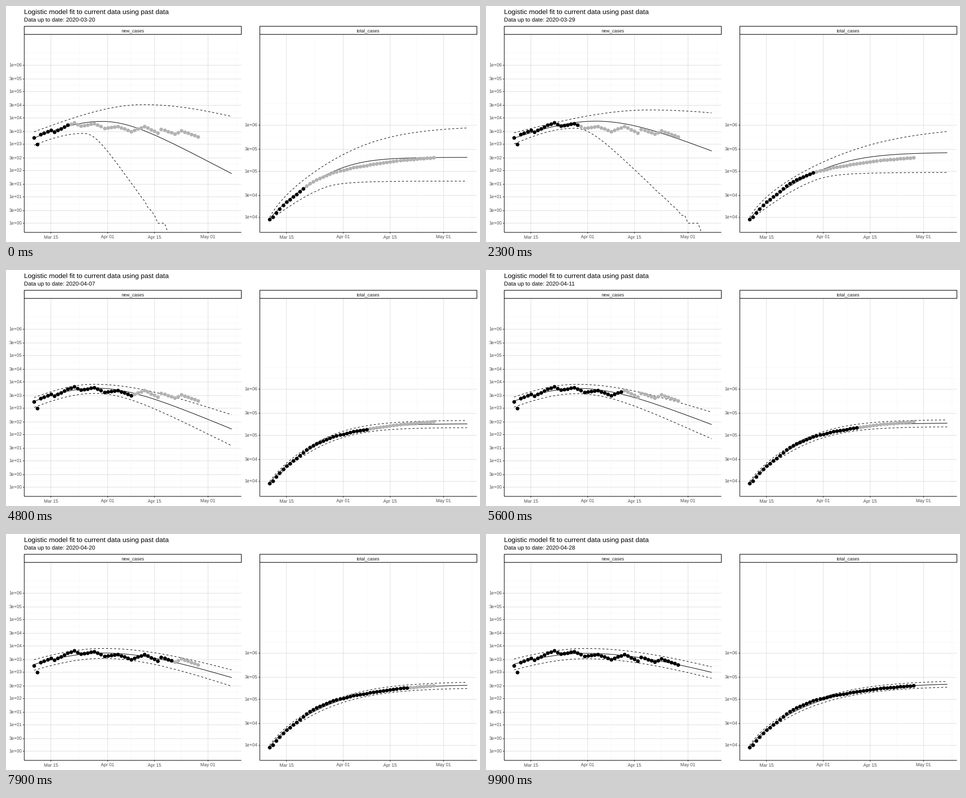
A matplotlib script for the animation above (10 s loop, 1000x500 px).

```python
import numpy as np
import matplotlib.pyplot as plt
from matplotlib.animation import FuncAnimation
from matplotlib.patches import Rectangle

W, H, DPI = 1000, 500, 100
FRAMES, LAST = 100, 39
PX = 72 / DPI                      # one pixel in points
DAY = 458 / 1.1 / 59               # pixels per day
DEC_NEW, DEC_TOTAL = 55.78, 97.6   # pixels per decade
ONE_NEW, ONE_TOTAL = 460.2, 838.3  # y of the value 1
LEFT, TOP, BOTTOM, WIDTH, SHIFT = 38.5, 60.0, 479.5, 458, 497
X0 = LEFT + WIDTH * 0.05 / 1.1
DAYS = np.arange(60)
BASE = 9400                        # fitted total on the first day

plt.rcParams.update({"font.family": "Liberation Sans",
                     "text.hinting": "none", "path.snap": False})

# Turning points of the daily counts: day, y
TURNS = [(0, 278.5), (1, 293), (2, 272), (5, 262.5), (6, 267), (10, 252),
         (12, 247), (14, 254), (18, 249), (21, 258.5), (25, 255), (29, 265.5),
         (33, 255), (37, 268.5), (38, 260.5), (42, 271), (44, 264), (49, 277)]

# Daily curves at the four stages of the fit: start y, peak x, peak y, end y
MID = [(279.5, 203, 244.5, 355), (280, 232, 244, 307),
       (279, 183, 249.5, 350.5), (275.5, 210, 252.8, 293)]
HIGH = [(266.5, 290, 209, 234), (268.5, 345, 220.3, 226.5),
        (272, 178, 242, 314.5), (264.8, 212, 242.6, 281.5)]
LOW = [(295, 165, 269.8, 671), (292, 187, 259, 502),
       (292, 180, 260.5, 393), (288, 210, 264.3, 305.5)]
SPREAD = [0.8, 0.85, 0.25, 0.17]   # how much daily spread reaches the totals


def stage(fit):
    """Swings out until fit 9, snaps back by fit 15, then settles."""
    if fit <= 9:
        return fit / 9
    if fit <= 15:
        return 1 + ((fit - 9) / 6) ** 3
    return 3 - (1 - (fit - 15) / 24) ** 1.5


def blend(keys, fit):
    return [np.interp(stage(fit), range(4), c) for c in np.transpose(keys)]


def log_y(values, one, decade):
    with np.errstate(divide="ignore"):
        return one - decade * np.log10(values)


def bell(start, peak_x, peak, end):
    """Logistic growth rate with its own slope on each side of the peak."""
    off = DAYS - (peak_x - X0) / DAY

    def side(edge, y):
        z = np.arccosh(10 ** ((y - peak) / (2 * DEC_NEW)))
        return np.cosh(z * off / edge) ** -2

    shape = np.where(off < 0, side(off[0], start), side(off[-1], end))
    return 10 ** ((ONE_NEW - peak) / DEC_NEW) * shape


def fit_curves(fit):
    daily = [bell(*blend(keys, fit)) for keys in (MID, HIGH, LOW)]
    sums = [BASE + np.cumsum(d) - d[0] for d in daily]
    spread = np.interp(stage(fit), range(4), SPREAD)
    totals = [sums[0] * (s / sums[0]) ** spread * 1.073 ** sign
              for s, sign in zip(sums, (0, 1, -1))]
    return ([log_y(np.round(d), ONE_NEW, DEC_NEW) for d in daily],
            [log_y(t, ONE_TOTAL, DEC_TOTAL) for t in totals])


STARTS = [round((FRAMES - 1) * n / LAST) for n in range(LAST + 1)]
CURVES = [fit_curves(n) for n in range(LAST + 1)]

DAILY = np.interp(DAYS[:50], *np.transpose(TURNS))
counts = 10 ** ((ONE_NEW - DAILY) / DEC_NEW)
counts[0] = 9160                   # everything up to the first day
TOTALS = log_y(np.cumsum(counts), ONE_TOTAL, DEC_TOTAL)

fig = plt.figure(figsize=(W / DPI, H / DPI), dpi=DPI, facecolor="white")
ax = fig.add_axes([0, 0, 1, 1])
ax.set_xlim(0, W)
ax.set_ylim(H, 0)
ax.axis("off")


def seg(xs, ys, color, width, z):
    ax.plot(xs, ys, color=color, lw=width * PX, zorder=z,
            solid_capstyle="butt")


def label(x, y, text, size, color="black", ha="left"):
    return ax.text(x, y, text, fontsize=size * PX, color=color, ha=ha,
                   va="baseline", zorder=9)


def grid_x(x, color, width):
    seg([x, x], [TOP, BOTTOM], color, width, 2)


def grid_y(left, y, color, width):
    seg([left, left + WIDTH], [y, y], color, width, 2)


def panel(left, name, one, decade, low):
    breaks = [(e, m) for e in range(low, 7) for m in (1, 3)]
    ys = [log_y(m * 10.0 ** e, one, decade) for e, m in breaks]
    edges = [2 * ys[0] - ys[1]] + ys
    for y in [(a + b) / 2 for a, b in zip(edges, edges[1:])] + ys[-1:]:
        if y < BOTTOM:
            grid_y(left, y, "#f6f6f6", 0.8)
    for (e, m), y in list(zip(breaks, ys))[:-1]:
        grid_y(left, y, "#dedede", 1.07)
        seg([left - 3, left], [y, y], "#333333", 1.07, 8)
        label(left - 5.3, y + 3.5, f"{m}e+{e:02d}", 9.6, "#4d4d4d", "right")

    first = left + X0 - LEFT
    ticks = {"Mar 15": 5, "Apr 01": 22, "Apr 15": 36, "May 01": 52}
    days = list(ticks.values())
    middles = [(a + b) / 2 for a, b in zip(days, days[1:] + [69])]
    for day in middles:
        grid_x(first + day * DAY, "#f6f6f6", 0.8)
    for text, day in ticks.items():
        x = first + day * DAY
        grid_x(x, "#dedede", 1.07)
        seg([x, x], [BOTTOM, BOTTOM + 3], "#333333", 1.07, 8)
        label(x, 493.3, text, 9.6, "#4d4d4d", "center")

    seg([left, left], [TOP, BOTTOM + 0.5], "black", 1.07, 8)
    seg([left, left + WIDTH], [BOTTOM, BOTTOM], "black", 1.07, 8)
    ax.add_patch(Rectangle((left, 43), WIDTH, 17.2, fc="white", ec="black",
                           lw=1.2 * PX, zorder=8))
    label(left + WIDTH / 2, 55.8, name, 9.6, "#1a1a1a", "center")

    clip = Rectangle((left, TOP), WIDTH, BOTTOM + 0.5 - TOP,
                     transform=ax.transData)
    lines = []
    for style in ("-", (0, (4, 4)), (0, (4, 4))):
        line, = ax.plot([], [], "k", ls=style, lw=1.07 * PX, zorder=4,
                        dash_capstyle="butt")
        line.set_clip_path(clip)
        lines.append(line)
    dots = [ax.plot([], [], "o", color=c, ms=7.8 * PX, mew=0, zorder=z)[0]
            for c, z in (("#b3b3b3", 5), ("black", 6))]
    return lines, dots


panels = [panel(LEFT, "new_cases", ONE_NEW, DEC_NEW, 0),
          panel(LEFT + SHIFT, "total_cases", ONE_TOTAL, DEC_TOTAL, 4)]
label(38, 17.2, "Logistic model fit to current data using past data", 14.4)
subtitle = label(38, 34, "", 12)


def draw(k):
    fit = sum(s <= k for s in STARTS) - 1
    known = fit + 11
    # Zero counts touch the floor only at the moment of a new fit
    floor = BOTTOM + 0.5 if k in STARTS else np.nan
    x = X0 + DAY * DAYS
    for (lines, dots), curves, heights in zip(panels, CURVES[fit],
                                              (DAILY, TOTALS)):
        for line, y in zip(lines, curves):
            line.set_data(x, np.where(np.isinf(y), floor, y))
        dots[0].set_data(x[:50], heights)
        dots[1].set_data(x[:known], heights[:known])
        x = x + SHIFT
    day = 20 + k * LAST // (FRAMES - 1)
    month, day = (3, day) if day <= 31 else (4, day - 31)
    subtitle.set_text(f"Data up to date: 2020-{month:02d}-{day:02d}")
    return [subtitle] + [a for group in panels for part in group for a in part]


anim = FuncAnimation(fig, draw, frames=FRAMES, interval=100, repeat=True,
                     repeat_delay=0)
plt.show()
```
